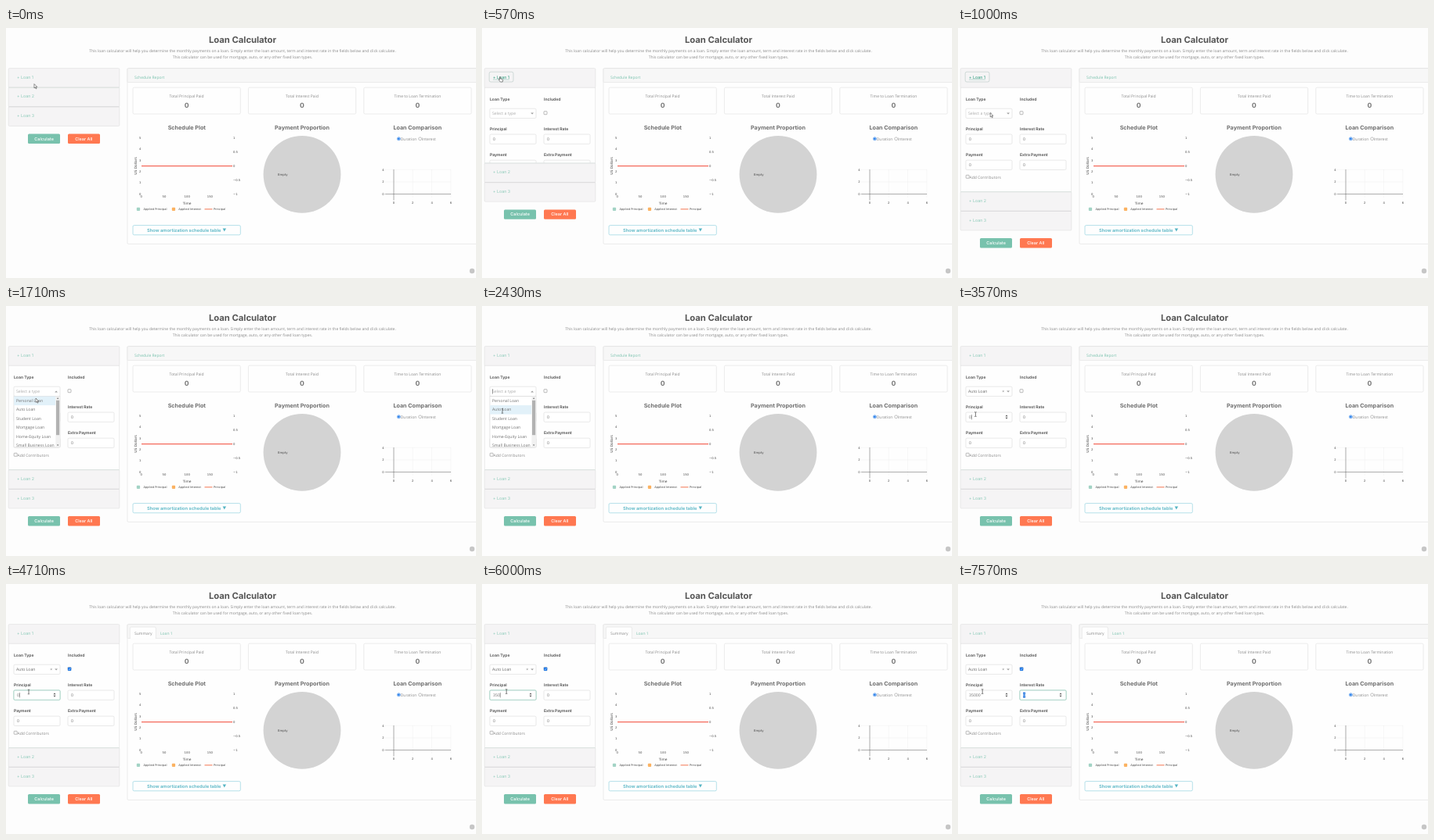
An HTML page that plays this animation: 600 px wide and 320 px high, repeating every 8 s.

```html
<!DOCTYPE html>
<html lang="en">
<head>
<meta charset="utf-8">
<title>Loan Calculator</title>
<style>
html, body { margin: 0; width: 100%; height: 100%; overflow: hidden; background: #fdfdfd; }
svg { display: block; width: 600px; height: 320px; }
text { font: 5px "Open Sans", sans-serif; fill: #888; text-rendering: geometricPrecision; white-space: pre; }
.bold { font: 700 5.05px Inter, sans-serif; fill: #5c5c5c; }
.title { font-size: 11.25px; fill: #555; }
.head { font-size: 7.2px; fill: #6e6e6e; }
.count { font-size: 8.6px; fill: #777; }
.btn { font: 500 5.5px Inter, sans-serif; fill: #fff; }
.link { font: 400 5.3px Inter, sans-serif; fill: #8ccbb9; }
.teal { fill: #78c2ad; }
.field { font-size: 5.15px; fill: #707070; }
.tick { font: 3.75px "DejaVu Sans", sans-serif; fill: #444; }
.axis { font-size: 4.375px; }
.legend { font-size: 3.6px; }
.info { font: 600 5.78px Inter, sans-serif; fill: #56b5c4; }
.mid { text-anchor: middle; }
.end { text-anchor: end; }
</style>
</head>
<body>
<svg id="stage" viewBox="0 0 600 320" xmlns="http://www.w3.org/2000/svg"></svg>
<script>
const text = (x, y, s, cls = '', more = '') => `<text x="${x}" y="${y}" class="${cls}" ${more}>${s}</text>`;
const rect = (x, y, w, h, fill, stroke = 'none', r = 0, more = '') =>
  `<rect x="${x}" y="${y}" width="${w}" height="${h}" rx="${r}" fill="${fill}" stroke="${stroke}" stroke-width=".5" ${more}/>`;
const line = (x1, y1, x2, y2, c, w = .4) => `<path d="M${x1} ${y1}L${x2} ${y2}" stroke="${c}" stroke-width="${w}" fill="none"/>`;
const shape = (d, fill, more = '') => `<path d="${d}" fill="${fill}" ${more}/>`;
const group = (id, inner, more = '') => `<g id="${id}" ${more}>${inner}</g>`;
const dot = (x, y, r, fill, more = '') => `<circle cx="${x}" cy="${y}" r="${r}" fill="${fill}" ${more}/>`;

const BORDER = '#d9d9d9', PANEL = '#f5f4f5', TEAL = '#78c2ad';

const box = (x, y) => rect(x, y, 59, 12.3, '#fff', '#d2d2d2', 1.5);
const check = (x, y) => rect(x, y, 4, 4, '#fff', '#777', .6);
const spinner = x => shape(`M${x} 141.3l1.5 -1.8 1.5 1.8zM${x} 142.7l1.5 1.8 1.5 -1.8z`, '#444');
const glow = (id, x) => group(id,
  rect(x - .5, 135.6, 60, 13.2, 'none', TEAL, 2, 'style="stroke-width:1;stroke-opacity:.25"') +
  rect(x, 136.1, 59, 12.2, 'none', '#8ccdbb', 1.5));
const header = (n, y) => rect(3.2, y, 141.6, 24.6, PANEL, BORDER, 1.2) + text(14, y + 13.1, '+ Loan ' + n, 'link');

function accordion() {
  const labels = [['Loan Type', 10, 93], ['Included', 79, 93], ['Principal', 10, 131],
    ['Interest Rate', 79, 131], ['Payment', 10, 164], ['Extra Payment', 79, 164]];
  const body = rect(3.2, 76, 141.6, 134, '#fefefe', BORDER) +
    labels.map(([s, x, y]) => text(x, y, s, 'bold')).join('') +
    box(10, 103.2) + check(79, 106.7) +
    box(10, 136.1) + box(79, 136.1) + box(10, 169.2) + box(79, 169.2) +
    text(14, 177.2, '0', 'field') + text(83, 177.2, '0', 'field') +
    check(10.2, 188.3) + text(14.6, 192.6, 'Add Contributors') +
    text(13, 111.2, '', 'field', 'id="choice"') +
    group('clear', text(56.2, 111, '×', 'field')) +
    shape('M62.2 108.6h3.8l-1.9 2z', '#999', 'id="arrow"') +
    group('checked', rect(79, 106.7, 4.2, 4.2, '#1a76e8', 'none', .6) +
      shape('M79.9 108.8l.9 .9 1.6 -1.8', 'none', 'stroke="#fff" stroke-width=".6"')) +
    glow('glowA', 10) + glow('glowB', 79) +
    rect(14, 138.6, 3.1, 7, '#2f7de0', 'none', 0, 'id="selA"') +
    rect(83, 138.6, 3.1, 7, '#2f7de0', 'none', 0, 'id="selB"') +
    text(14, 144.1, '0', 'field', 'id="amount"') + text(83, 144.1, '0', 'field', 'id="rate"') +
    group('spinA', spinner(60.5)) + group('spinB', spinner(129.5)) +
    rect(0, 0, .45, 6.4, '#333', 'none', 0, 'id="caret"') + menu();
  return `<clipPath id="fold"><rect id="foldBox" x="0" y="76" width="150" height="0"/></clipPath>` +
    group('body', body, 'clip-path="url(#fold)"') +
    header(1, 51.6) +
    group('focus', rect(9.2, 56.2, 30.8, 12.8, 'none', '#a9bfb9', 2) +
      text(14, 64.7, '+ Loan 1', 'link', 'style="fill:#5fae98"') + line(14, 66, 35, 66, '#5fae98')) +
    group('lower', header(2, 76.2) + line(3, 76.2, 145, 76.2, '#c3d3ce') +
      header(3, 100.9) + line(3, 100.9, 145, 100.9, '#cbc9cd') +
      rect(28, 135.6, 41, 12.4, TEAL, 'none', 1.5) + text(48.6, 143.7, 'Calculate', 'btn mid') +
      rect(79, 135.6, 41, 12.4, '#ff7851', 'none', 1.5) + text(99.2, 143.7, 'Clear All', 'btn mid'));
}

function menu() {
  const names = ['Personal Loan', 'Auto Loan', 'Student Loan', 'Mortgage Loan', 'Home-Equity Loan', 'Small Business Loan'];
  return '<clipPath id="menuClip"><rect x="9" y="115" width="61" height="65.7"/></clipPath>' +
    group('menu', rect(10, 115.4, 59, 65.1, '#fff', '#ccc') +
      rect(10.2, 115.6, 53.2, 11.5, '#e2f1f9', 'none', 0, 'id="hover"') +
      names.map((s, i) => text(13, 122.6 + 11.5 * i, s, 'field')).join('') +
      rect(63.4, 115.6, 5.4, 65, '#f1f1f1') + rect(64, 120.8, 4.2, 44.4, '#b2b2b2') +
      shape('M64.8 118.8l1.3 -1.5 1.3 1.5zM64.8 177.4l1.3 1.5 1.3 -1.5z', '#666'),
    'clip-path="url(#menuClip)"');
}

function report() {
  const cards = ['Total Principal Paid', 'Total Interest Paid', 'Time to Loan Termination'];
  return rect(155, 51.6, 460, 224.8, '#fefefe', BORDER, 1.2) + rect(155, 51.6, 460, 18, '#f7f7f7', BORDER, 1.2) +
    text(164, 65, 'Schedule Report', 'teal', 'id="plain"') +
    group('tabs', shape('M158.3 70V56.5q0 -1.4 1.4 -1.4h30.2q1.4 0 1.4 1.4V70', '#fefefe', `stroke="${BORDER}" stroke-width=".5"`) +
      text(164, 65, 'Summary') + text(197, 65, 'Loan 1', 'teal')) +
    cards.map((s, i) => {
      const x = 162 + 147.4 * i;
      return rect(x, 76.2, 137.3, 33.8, '#fefefe', BORDER, 1.5) +
        text(x + 68.6, 89, s, 'mid') + text(x + 68.6, 101.9, '0', 'bold count mid');
    }).join('') +
    schedule() + pie() + comparison() +
    rect(162, 252.6, 137.3, 12.2, '#fefefe', '#6cc3d5', 1.5) +
    text(180, 260.6, 'Show amortization schedule table', 'info') + shape('M276.6 256.4h4.4l-2.2 4.2z', '#56b5c4');
}

function schedule() {
  let s = text(230.8, 130, 'Schedule Plot', 'bold head mid');
  for (let i = 0; i <= 5; i++) s += text(172.3, 213.7 - 14.4 * i, i, 'tick end');
  ['−1', '−0.5', '0', '0.5', '1'].forEach((v, i) => s += text(290, 213.7 - 18 * i, v, 'tick'));
  for (let i = 0; i < 4; i++) s += text(172.8 + 29.2 * i, 217.3, 50 * i, 'tick mid');
  return s + line(173, 176.6, 289, 176.6, '#f4685a', 1.2) +
    text(231, 226, 'Time', 'tick axis mid') +
    text(0, 0, 'US Dollars', 'tick axis mid', 'transform="translate(167.4 176.4) rotate(-90)"') +
    rect(166.8, 229.7, 4.3, 4.3, '#a3d3c5', 'none', 1) + text(175.5, 233.2, 'Applied Principal', 'tick legend') +
    rect(211.8, 229.7, 4.3, 4.3, '#fbb262', 'none', 1) + text(220.3, 233.2, 'Applied Interest', 'tick legend') +
    line(253.5, 231.9, 263.5, 231.9, '#f4734f', 1) + text(265, 233.2, 'Principal', 'tick legend');
}

const pie = () => text(378, 130, 'Payment Proportion', 'bold head mid') +
  dot(378, 187.4, 49.4, '#d3d3d3') + text(347, 188.9, 'Empty', 'tick', 'style="font-size:3.9px"');

function comparison() {
  let s = text(525.3, 130, 'Loan Comparison', 'bold head mid') +
    dot(501.4, 141.8, 2, '#fff', 'stroke="#1a76e8" stroke-width=".6"') + dot(501.4, 141.8, 1.3, '#1a76e8') +
    text(503.7, 143.7, 'Duration') +
    dot(528.6, 141.8, 1.9, '#fff', 'stroke="#888" stroke-width=".5"') + text(530.9, 143.7, 'Interest');
  for (let i = 0; i < 4; i++) {
    const x = 495 + 24.3 * i, y = 212.6 - 15.6 * i;
    if (i) s += line(x, 181, x, 217, '#ebebeb');
    if (i && i < 3) s += line(484, y, 568, y, '#ebebeb');
    if (i < 3) s += text(482.6, y + 1.4, 2 * i, 'tick end');
    s += text(x, 225.3, 2 * i, 'tick mid');
  }
  return s + line(484, 212.6, 568, 212.6, '#555', .5) + line(495, 181, 495, 220.5, '#555', .5);
}

const edge = 'stroke="#222" stroke-width=".5" stroke-linejoin="round"';
const pointers = group('pointer',
  group('arrowPtr', shape('M0 0V5.4L1.3 4.2 2.2 6.2 3.1 5.8 2.2 3.8H3.8Z', '#fff', edge)) +
  group('handPtr', shape('M0 0q.8 -.6 1 .3V2.4l2.4 .6q.8 .3 .7 1.1L3.6 6.4H.8L-1.4 3.6q0 -.8 .8 -.5L0 3.6Z', '#fff', edge)) +
  group('beamPtr', shape('M-1.2 -2.8H-.3L0 -2.5 .3 -2.8H1.2M0 -2.5V2.5M-1.2 2.8H-.3L0 2.5 .3 2.8H1.2', 'none', 'stroke="#333" stroke-width=".65"')));

const stage = document.getElementById('stage');
stage.innerHTML = rect(0, 0, 600, 320, '#fdfdfd') +
  text(302, 19.3, 'Loan Calculator', 'bold title mid') +
  text(302, 31.2, 'This loan calculator will help you determine the monthly payments on a loan. Simply enter the loan amount, term and interest rate in the fields below and click calculate.', 'mid') +
  text(302, 38.9, 'This calculator can be used for mortgage, auto, or any other fixed loan types.', 'mid') +
  report() + accordion() + dot(595, 311, 3.2, '#c6c6c6') + pointers;

const el = {};
stage.querySelectorAll('[id]').forEach(e => el[e.id] = e);
const show = (id, on) => el[id].style.opacity = +on;
const move = (id, x, y) => el[id].setAttribute('transform', `translate(${x} ${y})`);
const put = (id, s) => { if (el[id].textContent !== s) el[id].textContent = s; };
const last = (steps, k) => steps.filter(s => s[0] <= k).pop();
const within = (k, a, b) => k >= a && k < b;
const clamp = v => Math.max(0, Math.min(1, v));

// The screen refreshes seven times a second; every step counts in those ticks.
const LOOP = 8000, RATE = 7 / 1000;
const path = [
  [0, 36, 71.6, 'arrow'], [1, 31, 69, 'arrow'], [2, 25, 65, 'arrow'], [3, 22.6, 62.6, 'hand'],
  [5, 24, 66, 'hand'], [6, 36, 93, 'arrow'], [7, 41.2, 108.6, 'arrow'],
  [12, 38, 118, 'arrow'], [13, 34, 126, 'beam'], [14, 30, 134, 'beam'], [15, 28, 142, 'beam'],
  [16, 27, 140, 'beam'], [17, 26, 134.4, 'beam'],
  [22, 24, 136, 'beam'], [23, 22.4, 138.6, 'beam'],
  [32, 25, 138.3, 'beam'], [33, 29, 138, 'beam'], [34, 31.2, 137.6, 'beam']];
const typed = [[0, '0'], [35, '3'], [39, '35'], [42, '350'], [46, '3500'], [47, '35000']];
const hovered = [[0, 0], [14, 1], [15, 2], [17, 1]];
const caretOn = [[9, 12], [15, 20], [25, 28], [32, 34], [35, 36], [39, 43], [46, 49]];

function draw(ms) {
  const k = Math.floor((ms + 5) * RATE), t = k / RATE;

  const open = 1 - (1 - clamp((t - 405) / 350)) ** 2, drop = 133.5 * open;
  el.foldBox.setAttribute('height', drop);
  move('lower', 0, drop);
  show('focus', within(k, 3, 9));

  const menuOpen = within(k, 9, 20), chosen = k >= 20;
  show('menu', menuOpen);
  el.hover.setAttribute('y', 115.6 + 11.5 * last(hovered, k)[1]);
  put('choice', chosen ? 'Auto Loan' : 'Select a type');
  el.choice.style.fill = chosen ? '#666' : '#aaa';
  el.arrow.setAttribute('transform', menuOpen ? 'rotate(180 64.1 109.6)' : '');
  show('clear', chosen);

  const updated = k >= 28;
  show('checked', updated);
  show('tabs', updated);
  show('plain', !updated);

  const amount = last(typed, k)[1];
  put('amount', amount);
  show('selA', k === 34);
  el.amount.style.fill = k === 34 ? '#fff' : '';
  show('glowA', k < 49 ? clamp((k - 25) / 2) : clamp((50 - k) / 2));
  show('spinA', k >= 23);
  const rateFocus = k >= 49;
  show('glowB', clamp((k - 48) / 2));
  show('selB', rateFocus);
  show('spinB', rateFocus);
  el.rate.style.fill = rateFocus ? '#fff' : '';

  show('caret', caretOn.some(([a, b]) => within(k, a, b)));
  move('caret', k < 20 ? 13 : 14.1 + 2.94 * amount.length, k < 20 ? 106.2 : 139);

  const [, x, y, kind] = last(path, k);
  move('pointer', x, y);
  for (const p of ['arrow', 'hand', 'beam']) show(p + 'Ptr', p === kind);
}

const start = performance.now();
function loop() {
  draw((performance.now() - start) % LOOP);
  requestAnimationFrame(loop);
}
loop();
</script>
</body>
</html>
```
